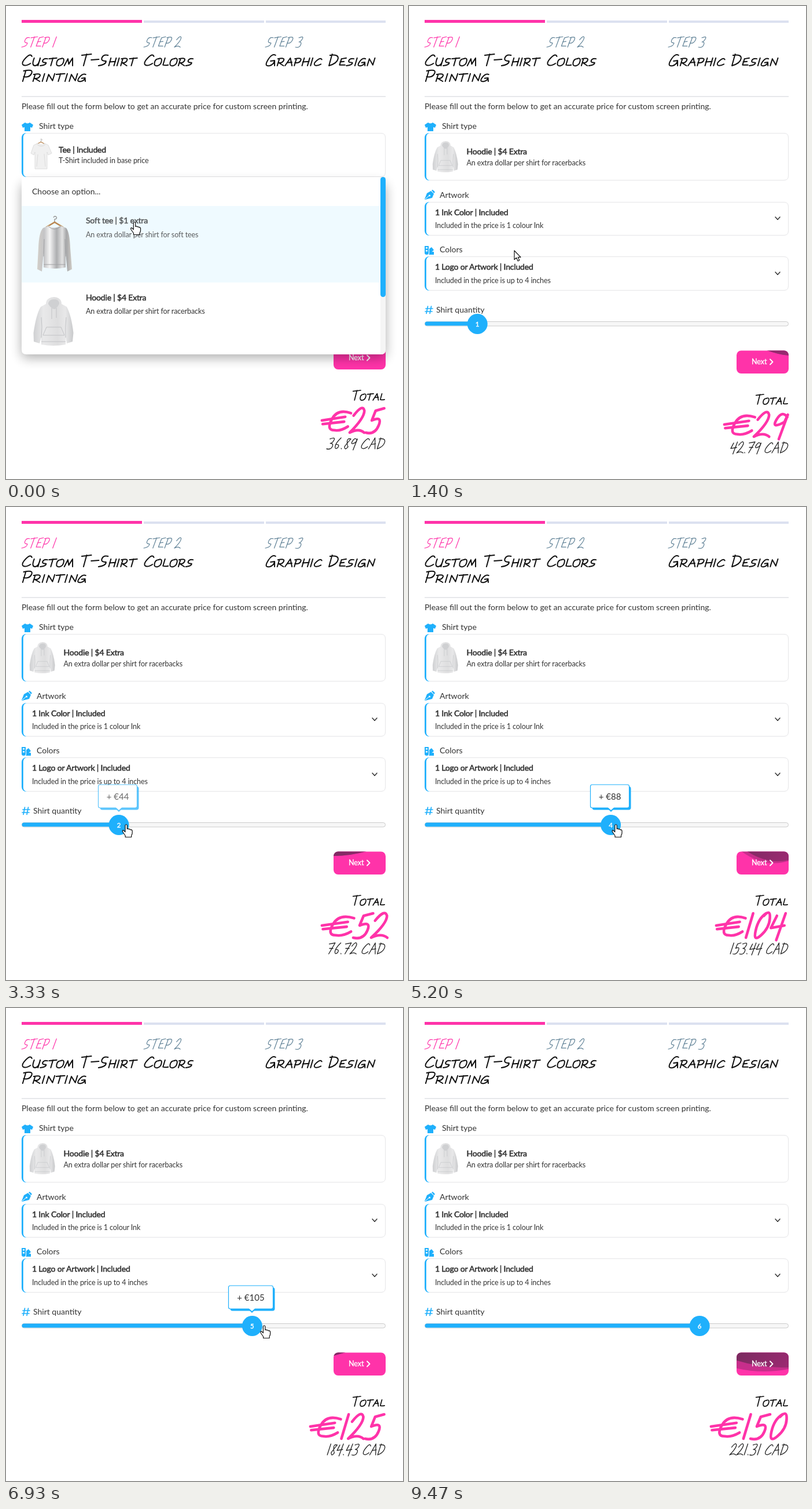
An HTML page that plays this animation: 686x816 px, repeating every 9540 ms.

```html
<!DOCTYPE html>
<html lang="en">
<head>
<meta charset="utf-8">
<title>Shirt price form</title>
<style>
  html, body { margin: 0; width: 100%; height: 100%; overflow: hidden; background: #fff; }
  svg { display: block; width: 686px; height: 816px; font-family: Lato, "Open Sans", sans-serif; }
  text { font-size: 14px; fill: #333; white-space: pre; }
  .title { stroke: #333; stroke-width: .55px; letter-spacing: -.18px; }
  .sub { font-size: 12.5px; letter-spacing: -.1px; }
  .ink path { fill: none; stroke: currentColor; vector-effect: non-scaling-stroke; stroke-linecap: round; stroke-linejoin: round; }
  .blue { fill: #1fb0fc; }
  .line { fill: none; stroke: #333; stroke-width: 1.5; stroke-linecap: round; stroke-linejoin: round; }
</style>
</head>
<body>
<svg viewBox="0 0 686 816">
  <defs>
    <linearGradient id="cloth">
      <stop offset="0" stop-color="#cfd0d2"/><stop offset=".25" stop-color="#e9e9ea"/>
      <stop offset=".6" stop-color="#dededf"/><stop offset=".8" stop-color="#e8e8e9"/>
      <stop offset="1" stop-color="#c8c9cb"/>
    </linearGradient>
    <linearGradient id="satin">
      <stop offset="0" stop-color="#d3cfc9"/><stop offset=".2" stop-color="#c4c4c6"/>
      <stop offset=".36" stop-color="#f4f4f4"/><stop offset=".56" stop-color="#adaeb0"/>
      <stop offset=".72" stop-color="#e2e2e2"/><stop offset=".84" stop-color="#a6a7a9"/>
      <stop offset="1" stop-color="#d0ccc6"/>
    </linearGradient>
    <linearGradient id="dusk" x2="1" y2="1">
      <stop offset=".4" stop-color="#7c2a60"/><stop offset="1" stop-color="#9c2a72"/>
    </linearGradient>
    <filter id="soft" x="-10%" y="-15%" width="120%" height="135%"><feGaussianBlur stdDeviation="10"/></filter>
    <clipPath id="menuClip"><path d="M27 295H656V593q0 8-8 8H35q-8 0-8-8Z"/></clipPath>
    <clipPath id="btnClip"><rect x="566" y="594.500" width="90" height="39.500" rx="8"/></clipPath>
    <g id="hoodie">
      <path fill="url(#cloth)" d="M22 12Q22 1 36 0Q49 1 49 12L58 17Q66 32 69.500 62L68 77L58 80L56 70V82Q35 86 14 82V70L11 80L1 77L.500 62Q5 30 13 17Z"/>
      <path fill="#cfd0d2" d="M26 12Q27 4 36 4Q45 4 45 12Q40 21 36 21Q31 20 26 12Z"/>
      <path fill="none" stroke="#c2c3c6" stroke-width="1" d="M32 19V38M40 19V36M23 52L17 66H54L48 52ZM14 77H56M14 35Q16 52 14 70M57 35Q55 52 56 70"/>
    </g>
    <g id="hanger" fill="none">
      <path stroke="#999" stroke-width="1.400" d="M31 10V6Q36 5 34 2Q31-1 29 3"/>
      <path stroke="#b98650" stroke-width="2.600" d="M16 20L31 11L46 20"/>
    </g>
    <g id="sweater">
      <use href="#hanger"/>
      <path fill="url(#satin)" d="M21 17Q31 24 41 17L51 21Q57 28 58 55L61 92L53 96L50 64V89Q31 93 12 89V64L9 96L1 92L3 55Q4 28 11 21Z"/>
      <path fill="none" stroke="#a0a1a3" d="M20 18Q31 28 42 18M12 84H50M13 40L12 70M49 40L50 70"/>
    </g>
    <g id="tee">
      <use href="#hanger" transform="translate(0 -2) scale(.56 .5)"/>
      <path fill="#f0f0f0" stroke="#d8d8d8" stroke-width=".8" d="M12 6Q18 11 24 6L30 9L36 23L30 26L28 21V50H7V21L5 26L0 23L5 9Z"/>
      <path fill="none" stroke="#dcdcdc" d="M11 8Q18 14 25 8M12 25L10 46M23 24L25 46"/>
    </g>
  </defs>

  <rect width="686" height="816" fill="#fff"/>
  <rect x="27" y="24" width="208" height="5" fill="#ff33a9"/>
  <path fill="#dce1f0" d="M238 25H446V29H238ZM449 25H656V29H449Z"/>
  <rect x="27" y="155.500" width="629" height="1.500" fill="#dfe1e5"/>
  <g id="heads"></g>
  <text x="27" y="178">Please fill out the form below to get an accurate price for custom screen printing.</text>

  <path class="blue" d="M33 201Q37 204 41 201L47 205L45 210L42 209V216H32V209L29 210L27 205Z"/>
  <text x="57" y="212">Shirt type</text>

  <g id="form">
    <g class="blue">
      <path d="M38 319L43 324L40 331L28 334L27 333L31 323ZM39 318L41 317L45 321L43 323Z"/>
      <circle cx="35.500" cy="327" r="1.500" fill="#fff"/><path stroke="#fff" d="M28 333L35 327"/>
      <path d="M27 414H34V426Q34 429 30.500 429T27 426ZM35 419L39 416L43 421L35 428ZM39 424H43V429H34Z"/>
      <path fill="#fff" d="M29 416H32V418.500H29ZM29 421H32V423.500H29Z"/>
    </g>
    <text x="53" y="331">Artwork</text>
    <text x="53" y="425">Colors</text>
    <path d="M32.500 518L30 530.500M38.500 518L36 530.500M29 522H41M28 527H40" stroke="#1fb0fc" stroke-width="1.700" stroke-linecap="round"/>
    <text x="47" y="529">Shirt quantity</text>
    <g id="cards"></g>
    <path class="line" d="M633 364L637 368.500L641 364M633 459L637 463.500L641 459"/>
    <rect x="27.500" y="544.500" width="628" height="7.500" rx="3.700" fill="#f7f7f7" stroke="#cbcbcb"/>
    <rect id="fill" class="blue" x="27.500" y="544.500" height="7" rx="3.500"/>
    <g id="knob">
      <circle class="blue" cy="548.500" r="17.500"/>
      <text id="qty" y="552.500" text-anchor="middle" style="font-size:11.500px;fill:#fff;stroke:#fff;stroke-width:.4px"></text>
    </g>
    <g id="tip">
      <rect id="tipShade" class="blue" y="482" height="40.500" rx="4"/>
      <rect id="tipBox" y="479" height="40" rx="3" fill="#fff" stroke="#1fb0fc" stroke-width="1.200"/>
      <path class="blue" d="M-7 519H7L0 526Z"/><path fill="#fff" d="M-5.500 518H5.500L0 523Z"/>
      <text id="tipText" x="-2" y="505" text-anchor="middle" style="font-size:15px"></text>
    </g>
  </g>

  <g id="lower">
    <rect x="566" y="594.500" width="90" height="39.500" rx="8" fill="#ff33a9"/>
    <g clip-path="url(#btnClip)">
      <path id="waveBack" fill="#b52c82" opacity=".75"/><path id="waveFront" fill="url(#dusk)"/>
    </g>
    <text x="592" y="617.500" style="font-size:12.500px;fill:#fff;stroke:#fff;stroke-width:.35px">Next</text>
    <path class="line" style="stroke:#fff;stroke-width:1.900" d="M624 609.500L628.500 614L624 618.500"/>
    <g id="total"></g>
  </g>

  <g id="picked"></g>

  <g id="menu">
    <rect x="27" y="307" width="629" height="300" rx="8" fill="#000" opacity=".32" filter="url(#soft)"/>
    <g clip-path="url(#menuClip)">
      <rect x="27" y="295" width="629" height="306" fill="#fff"/>
      <g id="list">
        <rect id="hover" x="27" width="620" height="132" fill="#effaff"/>
        <text x="45" y="325">Choose an option...</text>
        <use href="#sweater" x="53" y="362"/>
        <g id="rows"></g>
        <use href="#hoodie" x="47" y="502"/>
      </g>
      <rect x="647" y="295" width="9" height="306" fill="#f5f5f5"/>
      <rect id="thumb" class="blue" x="647" width="9" height="207" rx="4.500"/>
    </g>
  </g>

  <g id="cursor" fill="#fff" stroke="#111" stroke-width="1.200" stroke-linejoin="round">
    <path id="arrow" d="M0 0V15.500L3.600 12.300L6.200 18L8.800 16.800L6.300 11.300H11Z"/>
    <path id="hand" transform="translate(1 -.5)" d="M-1.700 1.500Q0-1 1.700 1.500V8Q3.500 6.500 4.700 8.500Q6.500 7.500 7.700 9.500Q9.500 8.500 10.500 11V15Q10.500 17 9 19V22H-1.500V19.500L-6 13Q-7 10-5 10L-1.700 13Z"/>
  </g>
</svg>
<script>
const $ = id => document.getElementById(id);
const set = (id, attrs) => { for (const k in attrs) $(id).setAttribute(k, attrs[k]); };
const show = (id, on) => set(id, { visibility: on ? 'visible' : 'hidden' });

// Marker-pen letters: advance, then strokes on a ten-unit-high grid.
const pen = {
  A: [9, 'M0 10L5 0L9 10M2 6L8 5.500'],
  C: [9, 'M9 2Q7-1 3 3T1 9Q4 11 9 8'],
  D: [9, 'M2 0L1 10M0 1Q9 0 9 4T1 10'],
  E: [8, 'M2 1L1 9L8 9M2 1L8 0M1 5L6 4.500'],
  G: [9, 'M8 1Q4-1 1 5T4 10Q8 9 8 5.500L4 6M8 5.500L9 10'],
  H: [9, 'M2 0L1 10M9 0L8 10M1 5L9 4.500'],
  I: [3, 'M2 0L1 10'],
  L: [8, 'M2 0L1 9Q4 10 8 9'],
  M: [11, 'M0 10L3 1L5.500 8L9 0L11 10'],
  N: [9, 'M1 10L2 1L8 9L9 0'],
  O: [9, 'M5 1Q0 1 0 6T5 10Q9 9 9 4T4 1'],
  P: [8, 'M2 1L1 10M0 1Q9-1 8 3T1 6'],
  R: [9, 'M2 1L1 10M0 1Q9-1 8 3T2 6L9 10'],
  S: [8, 'M8 1Q3 0 2 3T7 6Q8 9 0 10'],
  T: [9, 'M0 1L10 0M5 0L4 10'],
  U: [9, 'M1 0Q-1 10 4 10T9 0L8 10'],
  '-': [7, 'M0 5L8 4.500'],
  '.': [2, 'M1 9.500L1.500 10'],
  '€': [17, 'M17 2Q8 0 6 4.500T9 9Q13 9.500 17 7.500M0 5L14 3.500M1 6.500L14 5.500'],
  0: [8, 'M5 0Q1 2 1 7T5 9Q9 6 8 2T4 1'],
  1: [3, 'M2 0L1 10'],
  2: [8, 'M0 3Q4-2 6 1Q7 4 0 10Q5 8 9 10'],
  3: [8, 'M1 1Q8-1 7 2T3 5Q8 5 7 8T0 10'],
  4: [8, 'M2 1L0 6L8 5M7 0L5 11'],
  5: [8, 'M8 0L3 1L2 5Q8 3 7 7T0 10'],
  6: [7, 'M6 0Q0 5 1 8T5 9Q7 6 2 6'],
  7: [8, 'M0 1L8 0L3 10M2 5L7 5'],
  8: [7, 'M7 1Q1 0 3 4T6 8Q3 12 1 8Q3 5 7 1'],
  9: [7, 'M7 2Q3-1 1 3T6 4L7 1L5 11']
};

// Writes a word between two x positions; lower case becomes small, wide capitals.
function scrawl(word, x1, x2, base, height, color, weight, slant) {
  let x = 0;
  const marks = [...word].map(ch => {
    const small = /[a-z]/.test(ch);
    const w = small ? .8 : 1, h = small ? .66 : 1;
    const [adv, d] = pen[ch.toUpperCase()] || [4, ''];
    const mark = { x, w, h, d };
    x += (adv + 2) * w;
    return mark;
  });
  const lean = Math.tan(slant * Math.PI / 180) * height;
  const sx = (x2 - x1 - lean) / (x - 1.5), sy = height / 10;
  const paths = marks.map(m =>
    `<path d="${m.d}" stroke-width="${weight}" transform="translate(${m.x * sx} ${-height * m.h}) scale(${sx * m.w} ${sy * m.h})"/>`);
  return `<g class="ink" role="img" aria-label="${word}" style="color:${color}" transform="translate(${x1} ${base}) skewX(${-slant})">${paths.join('')}</g>`;
}

function pair(x, y, title, sub, gap) {
  return `<text class="title" x="${x}" y="${y}">${title}</text><text class="sub" x="${x}" y="${y + gap}">${sub}</text>`;
}

function card(y, h) {
  return `<rect class="blue" x="27" y="${y}" width="24" height="${h}" rx="8"/>
    <rect x="29.800" y="${y}" width="626" height="${h}" rx="7" fill="#fff"/>
    <path d="M36 ${y + .5}H648q7.500 0 7.500 7.500V${y + h - 8}q0 7.500-7.500 7.500H36" fill="none" stroke="#e5e5e7"/>`;
}

const steel = '#5f8196', pink = '#ff33a9';
const step = (n, x1, x2, color) => scrawl('STEP ' + n, x1, x2, 71, 18, color, 1.2, 17);
const head = (word, x1, x2, base) => scrawl(word, x1, x2, base, 20, '#111', 2, 11);
$('heads').innerHTML = step(1, 27, 89, pink) + step(2, 238, 306, steel) + step(3, 448, 515, steel) +
  head('Custom T-Shirt', 27, 227, 103) + head('Printing', 27, 141, 130) +
  head('Colors', 238, 325, 103) + head('Graphic Design', 449, 639, 103);

$('cards').innerHTML =
  card(338, 58) + pair(45, 361, '1 Ink Color | Included', 'Included in the price is 1 colour Ink', 22) +
  card(432, 59) + pair(45, 455, '1 Logo or Artwork | Included', 'Included in the price is up to 4 inches', 22.5);

const hoodie = ['Hoodie | $4 Extra', 'An extra dollar per shirt for racerbacks'];
$('rows').innerHTML =
  `<g id="softRow">${pair(138, 375, 'Soft tee | $1 extra', 'An extra dollar per shirt for soft tees', 23.5)}</g>` +
  `<g id="hoodRow">${pair(138, 508, ...hoodie, 23)}</g>`;

const pickedTee = card(219, 76) + '<use href="#tee" x="43" y="231"/>' +
  pair(91, 253, 'Tee | Included', 'T-Shirt included in base price', 18);
const pickedHoodie = card(219, 82) +
  '<use href="#hoodie" transform="translate(40.500 233) scale(.635 .64)"/>' + pair(99.5, 256, ...hoodie, 19);

// Price, price in dollars, left and right end of the price.
const totals = [
  [25, '36.89', 541, 655], [29, '42.79', 540, 657], [52, '76.72', 541, 667], [78, '115.08', 540, 658],
  [104, '153.44', 526, 655], [125, '184.43', 521, 655], [150, '221.31', 517, 656]
];
const extras = [0, 22, 44, 66, 88, 105, 126];

function drawTotal(i) {
  const [eur, cad, x1, x2] = totals[i];
  $('total').innerHTML = scrawl('Total', 597, 657, 687, 17, '#111', 1.7, 10) +
    scrawl('€' + eur, x1, x2, 743, 42, pink, 4.6, 13) +
    scrawl(cad + ' CAD', 554, 657, 771, 19, '#222', 1.3, 15);
}

// time, x, y
const trail = [
  [0, 221, 373], [670, 222, 470], [1070, 222, 470], [1400, 182, 422], [2000, 118, 548],
  [2500, 122, 548], [3000, 205, 548], [3400, 207, 548], [3730, 262, 548], [4070, 262, 548],
  [5000, 355, 548], [5400, 358, 548], [6000, 424, 548], [6930, 444, 548], [7000, 468, 548],
  [7900, 490, 546], [8300, 490, 546], [8930, 125, 768]
];
// time, depth at left, middle and right, width of the paler edge
const swell = [
  [0, -12, -12, -12, 0], [1400, -30, -3, 9, 0], [3330, 8, 3, -12, 0], [5200, -14, 13, 15, 5],
  [6930, 6, -7, -20, 0], [8130, -12, -12, -12, 0], [9470, 14, 24, 26, 9]
];

function at(keys, t, ease = u => u) {
  let i = 1;
  while (i < keys.length - 1 && keys[i][0] < t) i++;
  const a = keys[i - 1], b = keys[i];
  const u = ease(Math.min(1, (t - a[0]) / (b[0] - a[0])));
  return a.slice(1).map((v, k) => v + (b[k + 1] - v) * u);
}
const smooth = u => u * u * (3 - 2 * u);
const ramp = (t, a, b) => Math.min(1, Math.max(0, (t - a) / (b - a)));

function quantity(t) {
  if (t < 2000) return 1;
  if (t > 8000) return 6;
  return Math.round((at(trail, t)[0] - 41.4) / 76.8);
}

function wave(id, l, m, r) {
  set(id, { d: `M566 534V${594 + l}Q611 ${594 + 2 * m - (l + r) / 2} 656 ${594 + r}V534Z` });
}

const LOOP = 9540, TICK = 1000 / 15, CLOSE = 1130;
let lastTotal = -1, lastOpen = null;

function draw(now) {
  const t = Math.floor((now % LOOP + 4) / TICK) * TICK;
  const open = t < CLOSE;
  const [x, y] = at(trail, t);

  if (open !== lastOpen) {
    $('picked').innerHTML = open ? pickedTee : pickedHoodie;
    set('lower', { transform: `translate(0 ${open ? -7 : 0})` });
    set('form', { transform: `translate(0 ${open ? -7 : 0})` });
    show('menu', open);
    lastOpen = open;
  }

  const scroll = 44 * smooth(ramp(t, 130, 600));
  const onHoodie = y + scroll > 477;
  set('list', { transform: `translate(0 ${-scroll})` });
  set('hover', { y: onHoodie ? 477 : 345 });
  set('softRow', { opacity: onHoodie ? 1 : .8 });
  set('hoodRow', { opacity: onHoodie ? .8 : 1 });
  set('thumb', { y: 295 + scroll * .68 });

  const n = quantity(t), kx = 41.4 + 76.8 * n;
  set('fill', { width: kx - 27 });
  set('knob', { transform: `translate(${kx} 0)` });
  $('qty').textContent = n;

  const wide = n > 4 ? 77 : 67, left = -(wide + 4) / 2;
  set('tip', { transform: `translate(${Math.round(kx)} 0)`, opacity: ramp(t, 3160, 3400) * (1 - ramp(t, 9080, 9380)) });
  set('tipBox', { x: left, width: wide });
  set('tipShade', { x: left + 3, width: wide });
  $('tipText').textContent = '+ €' + extras[n];

  const total = open ? 0 : quantity(t - TICK);
  if (total !== lastTotal) drawTotal(lastTotal = total);

  const [l, m, r, edge] = at(swell, t, smooth);
  wave('waveFront', l, m, r);
  wave('waveBack', l + edge * 1.5, m + edge, r + edge * .3);

  const pointing = open || (t > 1960 && t < 8400);
  show('cursor', t < 8950);
  set('cursor', { transform: `translate(${x} ${y})` });
  set('hand', { display: pointing ? 'inline' : 'none' });
  set('arrow', { display: pointing ? 'none' : 'inline' });
}

const start = performance.now();
function loop() {
  draw(performance.now() - start);
  requestAnimationFrame(loop);
}
loop();
</script>
</body>
</html>
```
